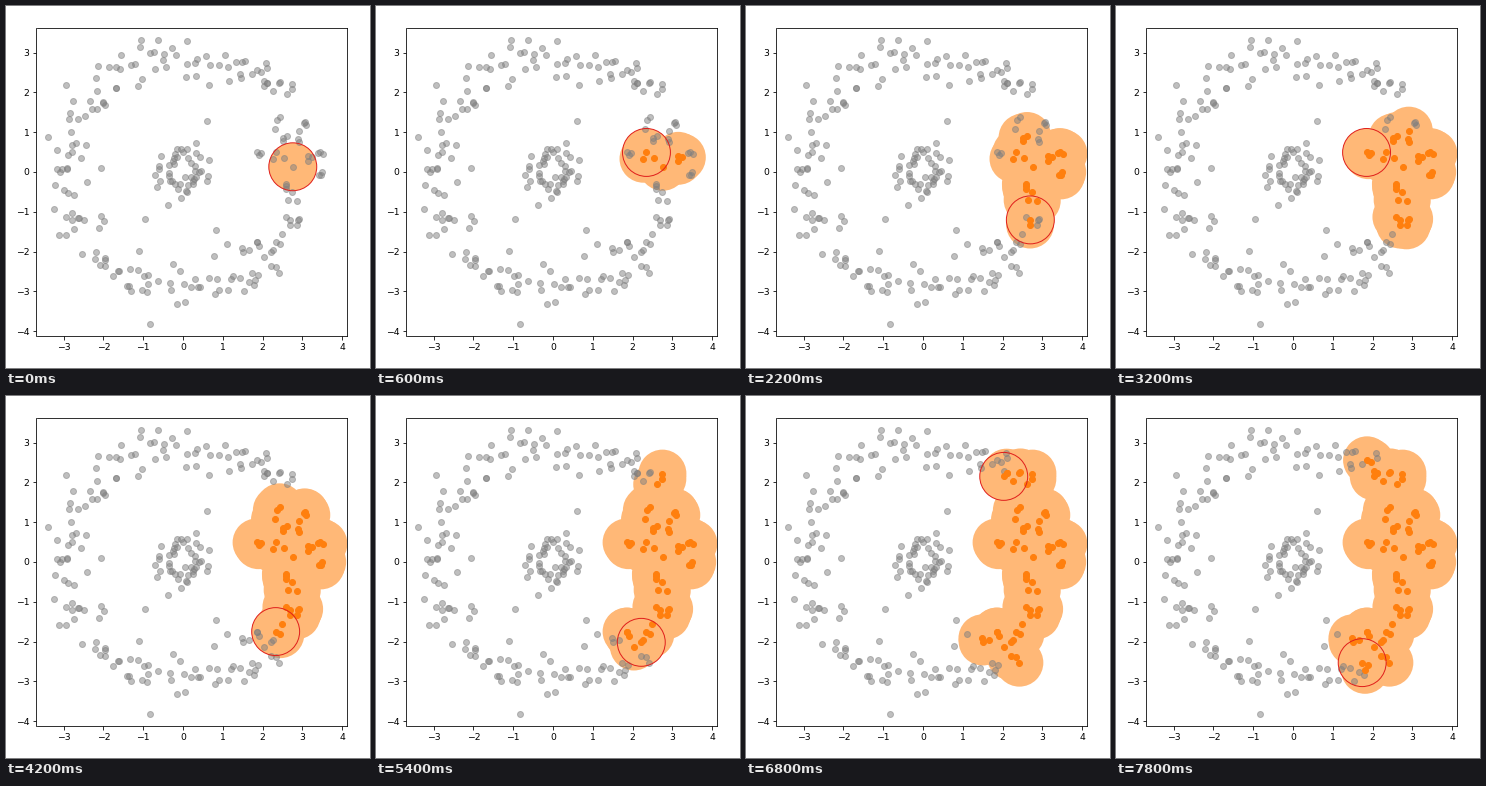
These frames come from a looping animation (364 by 362 pixels, 8 s). A matplotlib script:

```python
import numpy as np
import matplotlib.pyplot as plt
from matplotlib.animation import FuncAnimation
from matplotlib.patches import Circle

W, H, DPI = 364, 362, 72
STEPS, STEP_MS = 40, 200
EPS = 0.602
ORANGE, PALE, GRAY, RED = "#ff7f0e", "#ffb877", "gray", "#e0201c"

# The search starts here, then walks from hub to hub.
START = (2.76, .13)
HUBS = [
    (3.15, .28), (2.35, .49), (2.60, -.42), (2.86, -.72), (2.51, .79),
    (3.45, .50), (3.50, .00), (2.60, -1.13), (2.92, -1.18), (2.90, .82),
    (1.85, .49), (2.36, 1.30), (3.10, 1.18), (2.33, -1.75), (2.62, 1.95),
    (1.85, -1.75), (2.22, -2.02), (2.45, 2.25), (1.50, -2.00), (2.35, -2.40),
    (2.03, 2.15), (1.95, 2.50), (1.74, -2.53),
]
PER_HUB = 3
STRAYS = [(-2.05, .10), (-.95, -1.18), (.82, -1.45), (.60, 1.28), (-.83, -3.82)]

# Hubs finished at a few steps; the pace slows as the search spreads.
PACE_STEPS = [0, 7, 16, 21, 27, 34, 39]
PACE_HUBS = [0, 5, 11, 14, 17, 21, 23]

rng = np.random.default_rng(12)


def polar(r, a):
    return np.column_stack([r * np.cos(a), r * np.sin(a)])


def group(hub):
    """Close neighbours first, the hub itself last."""
    near = hub + rng.normal(0, 0.12, (PER_HUB - 1, 2))
    return np.vstack([near, hub])


def ring(n, radius, spread, start, stop):
    a = np.radians(np.linspace(start, stop, n)) + rng.normal(0, 0.06, n)
    return polar(rng.normal(radius, spread, n), a)


members = np.vstack([START] + [group(h) for h in HUBS])
others = np.vstack([
    ring(135, 2.92, 0.27, 52, 304),
    ring(46, 0.52, 0.17, 0, 352),
    STRAYS,
])

fig = plt.figure(figsize=(W / DPI, H / DPI), dpi=DPI, facecolor="white")
ax = fig.add_axes([30.5 / W, 32.5 / H, 310 / W, 308 / H])
ax.set_xlim(-3.68, 4.11)
ax.set_ylim(-4.11, 3.63)
ax.set_xticks(range(-3, 5))
ax.set_yticks(range(-4, 4))
ax.tick_params(labelsize=9.3)

discs = [ax.add_patch(Circle(p, EPS, fc=PALE, lw=0, zorder=1)) for p in members]
rest = ax.scatter([], [], s=36, c=GRAY, alpha=0.5, lw=1, zorder=2)
found = ax.scatter([], [], s=36, c=ORANGE, lw=1, zorder=2)
probe = ax.add_patch(Circle(START, EPS, fill=False, ec=RED, lw=1, zorder=3))


def draw(step):
    n = 1 + int(round(PER_HUB * np.interp(step, PACE_STEPS, PACE_HUBS)))
    colored = n if step else 0
    for i, disc in enumerate(discs):
        disc.set_visible(i < n)
    rest.set_offsets(np.vstack([others, members[colored:]]))
    found.set_offsets(members[:colored])
    probe.center = members[n - 1]
    return [*discs, rest, found, probe]


anim = FuncAnimation(fig, draw, frames=STEPS, interval=STEP_MS,
                     repeat=True, repeat_delay=0)
plt.show()
```
